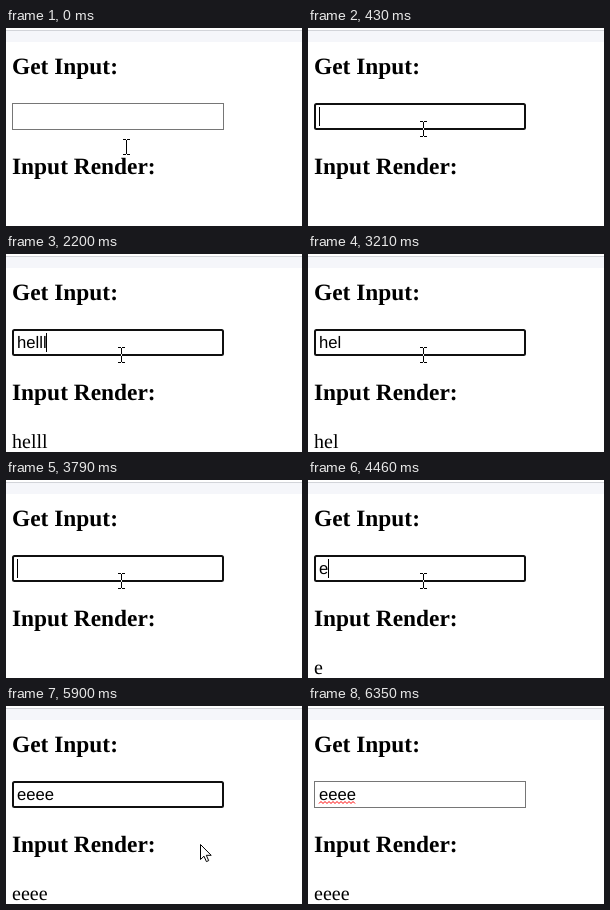
An HTML page that plays this animation: 296 px wide and 198 px high, repeating every 6.47 s.

```html
<!DOCTYPE html>
<html lang="en">
<head>
<meta charset="utf-8">
<title>Get Input</title>
<style>
  html, body { margin: 0; width: 100%; height: 100%; overflow: hidden; background: #fff; }
  svg { display: block; width: 296px; height: 198px; isolation: isolate; }
  text { text-rendering: geometricPrecision; white-space: pre; }
  .head { font: bold 23.4px "Liberation Serif", "Times New Roman", serif; }
  .out { font: 20px "Liberation Serif", "Times New Roman", serif; }
  .field { font: 16.667px "Liberation Sans", Arial, sans-serif; }
  #beam { fill: #fff; mix-blend-mode: difference; }
</style>
</head>
<body>
<svg viewBox="0 0 296 198">
  <rect width="296" height="198" fill="#fff"/>
  <rect y="3" width="296" height="11" fill="#f5f6fa"/>
  <rect y="2" width="296" height="1" fill="#d2d4d9"/>
  <text class="head" x="6" y="46">Get Input:</text>
  <text class="head" x="6" y="146">Input Render:</text>
  <rect id="thin" x="6.5" y="75.5" width="211" height="26" fill="#fff" stroke="#767676"/>
  <rect id="ring" x="7" y="76" width="210" height="25" rx="1.5" fill="#fff" stroke="#101010" stroke-width="2"/>
  <text id="typed" class="field" x="11" y="94"></text>
  <path id="wave" fill="none" stroke="#f00" stroke-width="1"/>
  <rect id="caret" y="79" width="1" height="19"/>
  <text id="echo" class="out" x="6" y="194"></text>
  <path id="beam" d="M-3-8h3v1h-3zM1-8h3v1h-3zM0-7h1v14h-1zM-3 7h3v1h-3zM1 7h3v1h-3z"/>
  <path id="arrow" d="M.5.5v15l3.5-3.3 2.4 5.4 2.3-1-2.4-5.3h4.9z" fill="#fff" stroke="#000"/>
</svg>
<script>
const LOOP = 6470;
const $ = id => document.getElementById(id);
const show = (id, on) => $(id).style.display = on ? "" : "none";

// time, text, caret visible
const typing = [
  [0, "", 0], [430, "", 1], [970, "", 0],
  [1300, "h", 1], [1420, "he", 1], [1750, "hel", 1], [1980, "hell", 1], [2200, "helll", 1],
  [2770, "helll", 0], [2990, "hell", 0], [3210, "hel", 0], [3330, "hel", 1],
  [3450, "he", 1], [3670, "h", 1], [3790, "", 1], [3910, "", 0], [4360, "", 1],
  [4460, "e", 1], [4790, "ee", 1], [5020, "eee", 1], [5240, "eeee", 1], [5800, "eeee", 0]
];

// time, pointer shape, x, y
const pointer = [
  [0, "beam", 120, 119], [110, "beam", 118, 108], [200, "beam", 116, 102],
  [430, "beam", 115, 101], [5690, "beam", 142, 108],
  [5800, "arrow", 194, 138], [5910, "arrow", 232, 178], [6020, "", 0, 0]
];

const focus = [[0, 0], [430, 1], [6350, 0]];

const at = (steps, t) => steps.findLast(s => s[0] <= t);
const textWidth = s => [...s].reduce((w, c) => w + (c === "l" ? 0.222 : 0.556) * 16.667, 0);

let wave = "M11 97.5";
for (let i = 1; i <= 18; i++) wave += `L${11 + i * 2} ${i % 2 ? 95.5 : 97.5}`;
$("wave").setAttribute("d", wave);

function draw(t) {
  const [, text, caret] = at(typing, t);
  const [, shape, x, y] = at(pointer, t);
  const focused = at(focus, t)[1];

  $("typed").textContent = $("echo").textContent = text;
  $("caret").setAttribute("x", Math.floor(11 + textWidth(text)));
  show("caret", caret && focused);
  show("ring", focused);
  show("thin", !focused);
  show("wave", !focused && text);
  for (const id of ["beam", "arrow"]) {
    show(id, id === shape);
    $(id).setAttribute("transform", `translate(${x} ${y})`);
  }
}

const start = performance.now();
function tick() {
  draw((performance.now() - start) % LOOP);
  requestAnimationFrame(tick);
}
tick();
</script>
</body>
</html>
```
